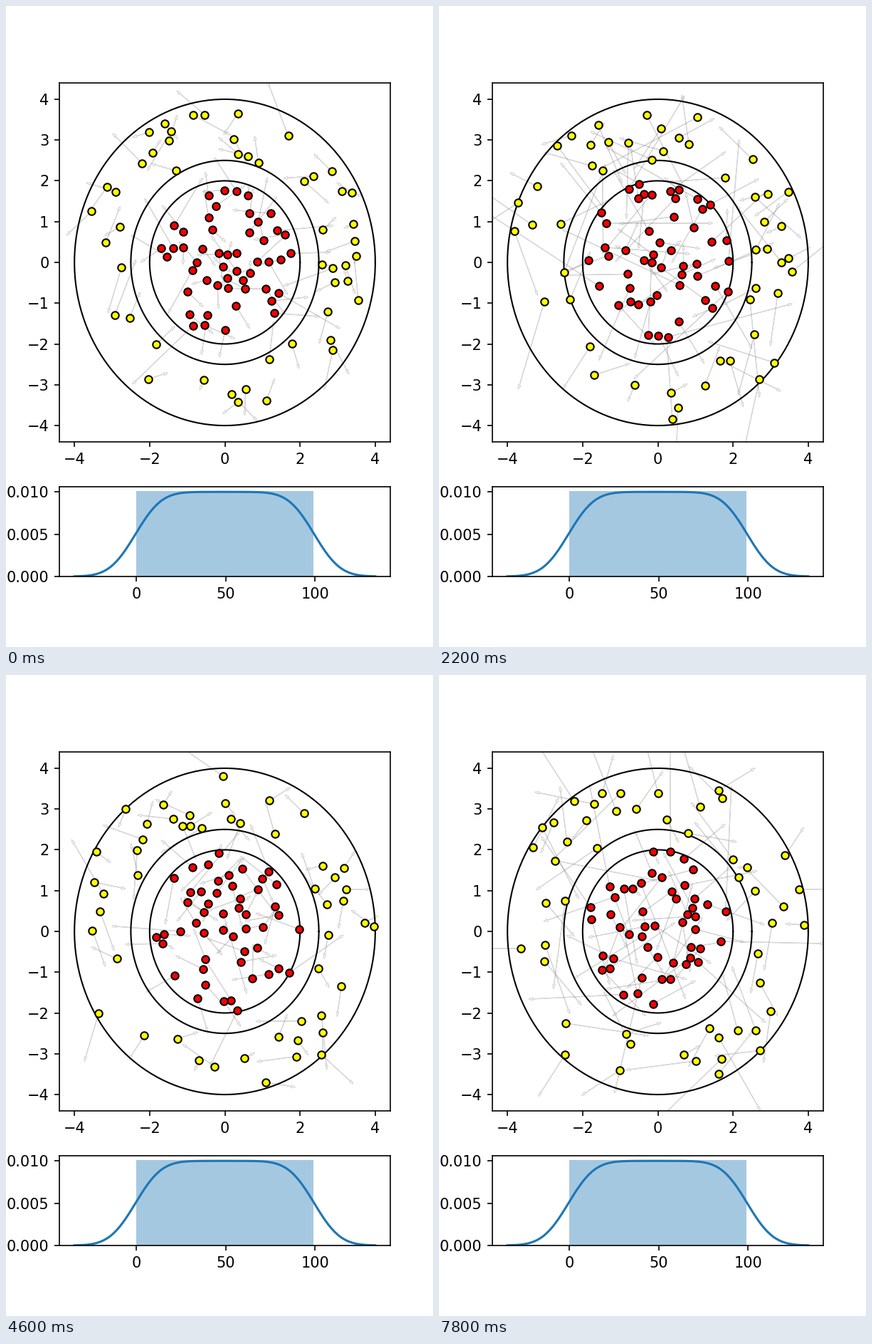
Animation of 600x900 px, one loop 8 s. Source, as a matplotlib script:

```python
import numpy as np
import matplotlib.pyplot as plt
from matplotlib.animation import FuncAnimation
from matplotlib.patches import FancyArrow

FRAMES, COUNT = 40, 50
DT, SUBSTEPS, TOUCH = 0.05, 4, 0.2
INNER, GAP, OUTER = 2.0, 2.5, 4.0
rng = np.random.default_rng(12)


def pace(n):
    """Common speed factor, rising and falling slowly."""
    return 1.45 + 0.55 * np.cos(2 * np.pi * (n - 12) / 29)


def core_spot():
    """A place in the disc, most often near its centre."""
    angle = rng.uniform(0, 2 * np.pi)
    return 1.9 * rng.random() ** 1.3 * np.array([np.cos(angle), np.sin(angle)])


def ring_spot():
    """A place in the ring, more often at the upper right."""
    turn = rng.uniform(0, 2 * np.pi)
    angle = turn - 0.45 * np.sin(turn - 0.7)
    return rng.uniform(2.55, 3.8) * np.array([np.cos(angle), np.sin(angle)])


def scatter(spot):
    """Random places that do not overlap."""
    placed = []
    while len(placed) < COUNT:
        new = spot()
        if all(np.hypot(*(new - old)) > 1.1 * TOUCH for old in placed):
            placed.append(new)
    return np.array(placed)


def bounce(pos, vel, radius, side):
    """Mirror particles off a circular wall; side 1 keeps them in, -1 out."""
    r = np.hypot(*pos.T)
    for i in np.flatnonzero((r - radius) * side > 0):
        normal = pos[i] / r[i]
        pos[i] = normal * (2 * radius - r[i])
        out = vel[i] @ normal
        if out * side > 0:
            vel[i] -= 2 * out * normal


def collide(pos, vel):
    """Elastic hits between equal masses that touch and approach."""
    gaps = np.hypot(*(pos[:, None] - pos[None]).transpose(2, 0, 1))
    for i, j in np.argwhere(np.triu(gaps < TOUCH, 1)):
        normal = (pos[i] - pos[j]) / gaps[i, j]
        closing = (vel[i] - vel[j]) @ normal
        if closing < 0:
            vel[i] -= closing * normal
            vel[j] += closing * normal


def simulate(spot, spread, walls):
    """Places and velocities per frame; spread pushes a cluster apart."""
    pos = scatter(spot)
    vel = rng.normal(0, 0.55, pos.shape) + spread * pos
    track = []
    for n in range(FRAMES):
        track.append((pos.copy(), vel * pace(n)))
        for _ in range(SUBSTEPS):
            collide(pos, vel)
            pos += vel * pace(n) * DT / SUBSTEPS
            for radius, side in walls:
                bounce(pos, vel, radius, side)
    return track


tracks = [simulate(core_spot, 0.3, [(INNER, 1)]),
          simulate(ring_spot, 0, [(GAP, -1), (OUTER, 1)])]

fig, (ax, low) = plt.subplots(2, 1, figsize=(4, 6), dpi=150,
                              gridspec_kw={"height_ratios": [4, 1]})
ax.set(xlim=(-4.4, 4.4), ylim=(-4.4, 4.4),
       xticks=range(-4, 5, 2), yticks=range(-4, 5))
angle = np.linspace(0, 2 * np.pi, 300)
for radius in (INNER, GAP, OUTER):
    ax.plot(radius * np.cos(angle), radius * np.sin(angle), "k", lw=1)
dots = [ax.plot([], [], "o", ms=5, mfc=color, mec="black", mew=1, zorder=3)[0]
        for color in ("red", "yellow")]

# Uniform histogram with its Gaussian density estimate
data = np.arange(100)
width = data.std(ddof=1) * len(data) ** -0.2
x = np.linspace(-3 * width, 99 + 3 * width, 200)
density = np.exp(-((x[:, None] - data) / width) ** 2 / 2).mean(1)
low.bar(49.5, 1 / 99, 99, color="C0", alpha=0.4)
low.plot(x, density / (width * np.sqrt(2 * np.pi)), "C0", lw=1.5)
margin = 0.05 * (x[-1] - x[0])
low.set(xlim=(x[0] - margin, x[-1] + margin), ylim=(0, 1.05 / 99),
        xticks=(0, 50, 100), yticks=(0, 0.005, 0.01))

arrows = []


def draw(n):
    while arrows:
        arrows.pop().remove()
    for dot, track in zip(dots, tracks):
        pos, vel = track[n]
        dot.set_data(*pos.T)
        for (px, py), (vx, vy) in zip(pos, vel):
            arrow = FancyArrow(px, py, vx, vy, width=0.001, head_width=0.07,
                               head_length=0.11, fc="none", ec="gray",
                               lw=0.6, alpha=0.3)
            arrows.append(ax.add_patch(arrow))
    return dots


anim = FuncAnimation(fig, draw, frames=FRAMES, interval=200,
                     init_func=lambda: draw(0), repeat=True, repeat_delay=0)
plt.show()
```
